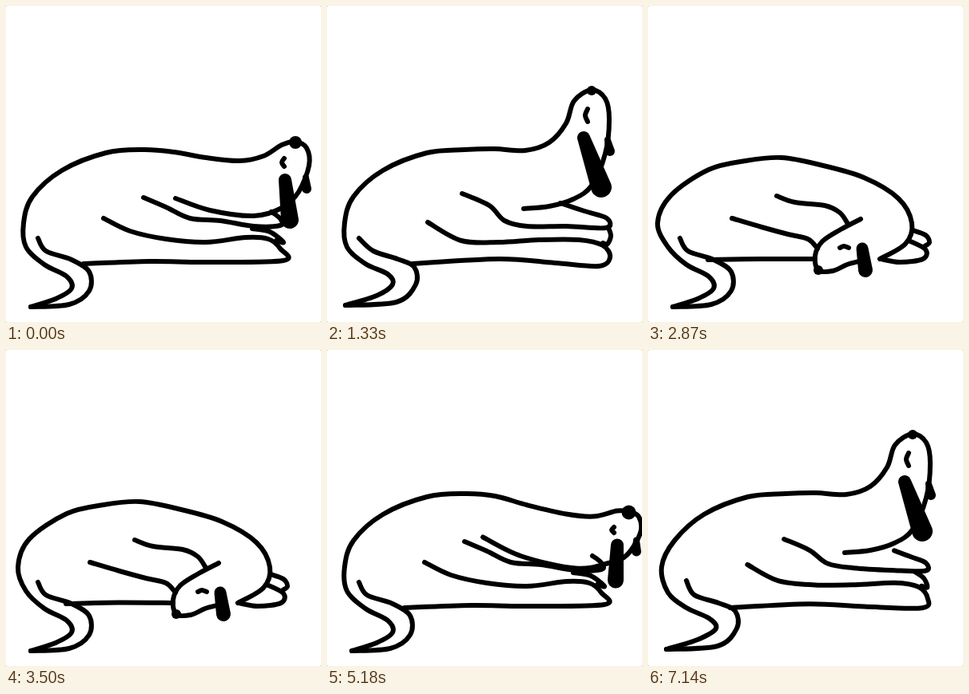
These frames come from a looping animation (394x396 px, 7.21 s). An HTML page with a canvas:

```html
<!DOCTYPE html>
<html lang="en">
<head>
<meta charset="utf-8">
<title>Sleepy dog</title>
<style>
  html, body { margin: 0; width: 100%; height: 100%; overflow: hidden; background: #888; }
  canvas { display: block; width: 394px; height: 396px; border-radius: 2px; background: #fff; }
</style>
</head>
<body>
<canvas id="stage" width="394" height="396"></canvas>
<script>
const LOOP = 7210, CYCLE = 5530, STEP = 70, HOWL = 700;
const ctx = document.getElementById('stage').getContext('2d');

const clamp = v => Math.max(0, Math.min(1, v));
const ease = k => k * k * (3 - 2 * k);
const mix = (a, b, k) => Array.isArray(a) ? a.map((v, i) => mix(v, b[i], k)) : a + (b - a) * k;

// time, awake, level, sway
// level: head height when awake, how far the dog still has to curl up otherwise
const keys = [
  [0, 1, 0, 0], [420, 1, 1, 0], [HOWL, 1, 1, 0], [1050, 1, 1, 1], [1330, 1, 1, 0], [1610, 1, 1, 1],
  [1750, 1, 1, 1], [2100, 1, .47, 0], [2380, 1, -.5, 0],
  [2450, 0, 1, 0], [2730, 0, 0, 0], [2870, 0, 0, 0], [3310, 0, 0, 1], [3750, 0, 0, 0], [4200, 0, 0, 1],
  [4760, 0, 0, 0], [5040, 0, 1, 0], [5110, 1, -.5, 0], [5250, 1, -.5, 0], [CYCLE, 1, 0, 0]
];

// Parts that follow the head, at level 0 and level 1
const low = {
  head: [250,190, 292,194, 322,188, 345,174, 362,170, 376,178, 379,200, 366,233, 345,253, 310,263, 255,256, 212,241],
  fore: [172,240, 200,252, 230,266, 268,269, 310,276, 343,275, 344,268, 338,262, 332,258],
  hind: [122,266, 155,282, 200,292, 250,296, 300,290, 328,292, 343,304, 347,319, 249,321, 180,320, 97,323],
  paw: [308,279, 330,283, 347,296, 338,294],
  blobs: [[349,218,8, 355,268,11], [375,215,4, 376,229,6], [362,171,8, 362,171,8]],
  eye: [346,196,5]
};
const high = {
  head: [248,181, 278,171, 299,147, 309,119, 331,105, 348,116, 353,142, 348,185, 331,225, 308,242, 278,251, 246,254],
  fore: [169,235, 203,250, 222,269, 250,276, 300,276, 349,278, 350,266, 322,257, 292,247],
  hind: [126,271, 168,294, 215,296, 265,293, 315,293, 345,300, 354,315, 340,326, 285,322, 215,317, 107,323],
  paw: [352,278, 355,288, 351,298, 345,297],
  blobs: [[321,165,8, 343,227,13], [351,168,4, 354,182,6], [331,106,6, 331,106,6]],
  eye: [324,137,8]
};

// Change the x of every point in a flat list
const moveX = (p, f) => p.map((v, i) => i % 2 ? v : v + f(v));

const tail = (u, s) => [
  40 + 8 * s, 291 - 2 * s, 50 + 8 * u, 307, 82 + 6 * u, 318 - u, 104 + 5 * u, 333 - 6 * u,
  104 + 7 * u, 357 - 8 * u, 79 + 8 * u, 374 - 3 * u, 31 - 8 * u, 377 - 2 * u
];
const rump = (u, s, left) => [
  31 - 8 * u, 377 - 2 * u, 62, 367 - 4 * u, 82 + 3 * s, 354 - 5 * u, 76, 339 - 3 * u,
  48, 324 - u, 25, 302 + 2 * s, left, 272
];

function awakeDog(level, s) {
  const u = clamp(level), lead = 28 * u * (1 - u);
  const bend = p => moveX(p, x => lead * clamp((x - 300) / 40));
  const at = mix(low, high, 0) && (name => mix(low[name], high[name], level));
  const leg = name => mix(low[name], high[name], clamp(level - .4 * s));
  const [x, y, h] = at('eye');
  return {
    lines: [
      tail(u, s),
      [...rump(u, s, 22 - 5 * s), 33,239, 70,206, 125,184, 172,180, 210,183 - 4 * u, ...bend(at('head'))],
      leg('fore'), leg('paw'), leg('hind'),
      [x + 2, y - h, x - 1, y, x + 2, y + h]
    ],
    blobs: at('blobs').map(([ax, ay, ar, bx, by, br]) => [ax + lead / 2, ay, ar, bx + lead, by, br])
  };
}

function curledDog(level, s) {
  const shift = x => 55 * level * clamp((x - 120) / 120);
  return {
    lines: [
      tail(0, 0),
      [...rump(0, 0, 12 + 5 * s), 29,237, 76,205, 122,194, 167,190, 215,199, 270,215, 313,241, 330,272, 322,298, 290,317],
      [161,238, 184,246, 221,250, 240,259, 250,273],
      [105,266, 142,277, 175,286, 200,292, 212,304],
      [75,318, 140,317 - s, 209,317],
      [331,281, 347,287, 352,296, 346,301],
      [326,294, 347,305, 344,317, 315,321, 291,317],
      [266,267, 241,280, 218,295, 209,313, 213,331, 231,332, 249,324, 264,320],
      [240,303, 245,301, 251,303]
    ].map(p => moveX(p, shift)),
    blobs: [[268,304,7.5, 272,331,9], [213,331,6, 213,331,6]]
      .map(([ax, ay, ar, bx, by, br]) => [ax + shift(ax), ay, ar, bx + shift(bx), by, br])
  };
}

function dogAt(t) {
  const i = keys.findIndex(key => key[0] > t), a = keys[i - 1], b = keys[i];
  const k = a[1] === b[1] ? ease((t - a[0]) / (b[0] - a[0])) : 0;
  const [, awake, level, sway] = mix(a, b, k);
  return (awake ? awakeDog : curledDog)(level, sway);
}

// Smooth curve through all points
function curve(p) {
  const n = p.length / 2;
  const at = i => { i = 2 * Math.max(0, Math.min(n - 1, i)); return [p[i], p[i + 1]]; };
  ctx.beginPath();
  ctx.moveTo(p[0], p[1]);
  for (let i = 0; i < n - 1; i++) {
    const [a, b, c, d] = [at(i - 1), at(i), at(i + 1), at(i + 2)];
    ctx.bezierCurveTo(b[0] + (c[0] - a[0]) / 6, b[1] + (c[1] - a[1]) / 6,
      c[0] - (d[0] - b[0]) / 6, c[1] - (d[1] - b[1]) / 6, c[0], c[1]);
  }
  ctx.stroke();
}

// Tapered capsule: x, y, radius at both ends
function blob([x, y, r, x2, y2, r2]) {
  const dir = Math.atan2(y2 - y, x2 - x), q = Math.PI / 2;
  ctx.beginPath();
  ctx.arc(x, y, r, dir + q, dir - q);
  ctx.arc(x2, y2, r2, dir - q, dir + q);
  ctx.fill();
}

function dot(age) {
  const y = 90 - age * 0.154;
  if (age < 0 || y < 9) return;
  ctx.fillStyle = '#df2029';
  blob([332, y, 3.5, 332, y, 3.5]);
}

function draw(now) {
  const t = Math.floor(now % LOOP / STEP) * STEP % CYCLE;
  const dog = dogAt(t);
  ctx.fillStyle = '#fff';
  ctx.fillRect(0, 0, 394, 396);
  ctx.fillStyle = ctx.strokeStyle = '#000';
  ctx.lineWidth = 6;
  ctx.lineCap = ctx.lineJoin = 'round';
  dog.lines.forEach(curve);
  dog.blobs.forEach(blob);
  dot(t - HOWL);
}

const start = performance.now();
function tick() {
  draw(performance.now() - start);
  requestAnimationFrame(tick);
}
tick();
</script>
</body>
</html>
```
